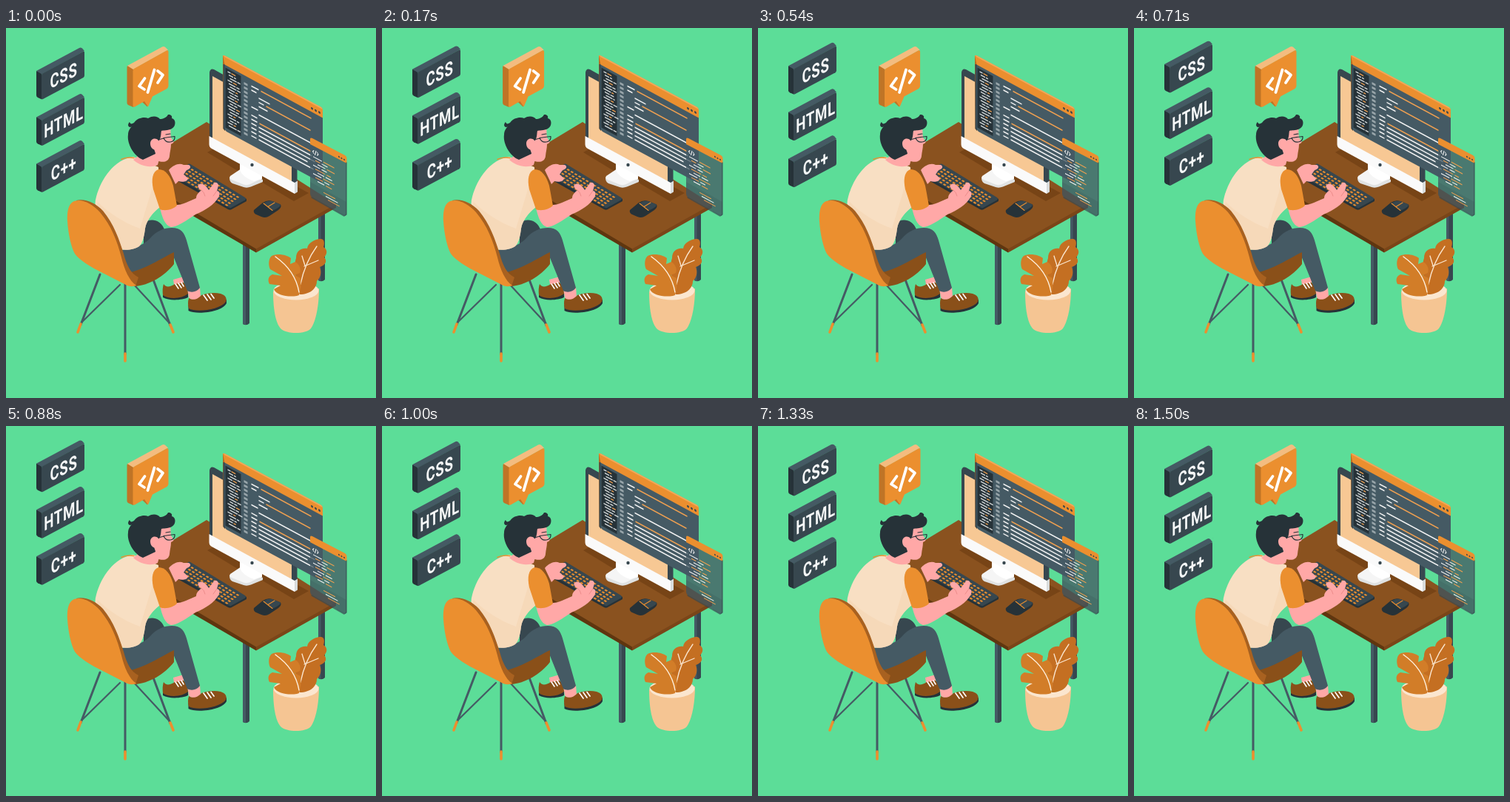
Recreate the animation shown at these times as an HTML page. Size 500 px wide and 500 px high, loop 1540 ms.

```html
<!DOCTYPE html>
<html lang="en">
<head>
<meta charset="utf-8">
<title>Programmer at a desk</title>
<style>
html, body { margin: 0; width: 100%; height: 100%; overflow: hidden; background: #5cdd98; }
svg { display: block; width: 100vw; height: 100vh; }
text { font-family: Roboto, "Liberation Sans", sans-serif; font-weight: 700; font-size: 26px; letter-spacing: .8px; fill: #f5f7f7; text-anchor: middle; }
.ln { fill: none; stroke-linecap: round; stroke-linejoin: round; }
.o { fill: #eb8f2f; }
.pink { fill: #ffa8a7; }
.slate { fill: #455a64; }
.mid { fill: #37474f; }
.ink { fill: #263238; }
.brown { fill: #8a5019; }
.tan { fill: #f5c593; }
</style>
</head>
<body>
<svg viewBox="0 0 500 500">
  <g id="signs"></g>

  <g id="bubble">
    <path fill="#bf7426" d="M164 51L172 55V107L165 104Q163.5 103 163.5 101V53Z"/>
    <path fill="#f3bc80" d="M164 51L211 25.5Q213 24.5 215 25.8L219 29.5L172 56Z"/>
    <path fill="#bf7426" d="M183 99L191 106.500L194 96Z"/>
    <path class="o" d="M173 55L217 30.500Q219.500 29.500 219.500 32V78Q219.500 80.500 217.500 82L198 92.500L192 106.500L187 99L174 106.500Q171.500 107.500 171.500 105V58Q171.500 56 173 55Z"/>
    <path class="ln" stroke="#fff" stroke-width="3.800" d="M187.500 68L180 78.500L187 83M200.500 56.500L191.500 87M205 58L212 63.500L205 74"/>
  </g>

  <!-- desk -->
  <path class="mid" d="M422 245H431V340Q427 344 422 341Z"/>
  <path class="slate" d="M422 245H425.500V342L422 341Z"/>
  <path class="mid" d="M320 288H329V399Q325 403 320 400Z"/>
  <path class="slate" d="M320 288H324V401L320 400Z"/>
  <path fill="#5f360f" d="M165 194L338 296V303.500L165 203Z"/>
  <path fill="#7a4518" d="M338 296L446 236V243L338 303.500Z"/>
  <path fill="#8a521f" d="M271 127L446 238L338 298.500L165 195V191Z"/>
  <path fill="#774416" d="M272 168L290 158L409 223L389 234L345 208L318 196Z"/>

  <!-- monitor -->
  <path fill="#e0e2e2" d="M302 202L318 191L347 205V208L331 214.500Q326 216.500 321 215L306 210Q302 208 302 202Z"/>
  <path fill="#f5f5f5" d="M303 200L318 190L346 203L330 211Q326 213 321 211.500L305 205Q301 203 303 200Z"/>
  <path fill="#fff" d="M316 181L346 197V204L335 207Q320 202 316 192Z"/>
  <path class="mid" d="M275 60Q276 54 281 56L390 117Q393 119 393.500 123V212L275 148Z"/>
  <path fill="#f7c894" d="M279 65L386 124V209L279 150Z"/>
  <path fill="#fafafa" d="M274.500 146L390 209V224L278 163Q274.500 161 274.500 157Z"/>
  <path fill="#d9dcdc" d="M390 209L394 206.500V221.500L390 224Z"/>
  <circle class="mid" cx="332.500" cy="185" r="2.200"/>

  <!-- code windows -->
  <path fill="#b86b20" d="M293 37L296 38V139L293.500 136Z"/>
  <path class="mid" d="M293.500 49H296V139L293.500 136Z"/>
  <path class="slate" d="M295.500 48L428 120V206Q427 210 424 208L298 140Q295.500 138 295.500 135Z"/>
  <path class="o" d="M293 37Q295 36.500 297 38L426 107Q428 108.500 428 111V121.500L295.500 49.500Z"/>
  <path fill="#f1a85c" d="M293 37L296 37.500L426 107L428 110L296 39.500Z"/>
  <g id="code" transform="matrix(1 .54 0 1 295.500 50)"></g>

  <path fill="#455a64" fill-opacity=".76" d="M411 155L460 181V252Q459 255 456 253L414 229Q411 227 411 224Z"/>
  <path fill="#263238" fill-opacity=".12" d="M411 208L460 235V252Q459 255 456 253L414 229Q411 227 411 224Z"/>
  <path class="o" d="M411 150Q411 147.500 414 149L458 172Q460.500 173.500 460.500 176V183L411 157Z"/>
  <path class="ln" stroke="#37474f" stroke-opacity=".65" stroke-width="1.500" d="M460 182V252L457 254L413 229"/>
  <g id="mini" transform="matrix(1 .54 0 1 411 157)"></g>

  <!-- keyboard and mouse -->
  <path class="ink" d="M228 202L247 184L325 231V234L304 245.500Q302 246 300 245L229 205Z"/>
  <path class="mid" d="M229 201L246 184Q248 183 250 184.500L323 229Q325 231 323 232.500L304 243Q302 243.500 300 242Z"/>
  <g id="keys"></g>
  <path class="ink" d="M335 246L347 236Q353 232 360 234L371 238.500Q373 242 368 246L356 254Q351 257.500 345 255L337 251.500Q334 249 335 246Z"/>
  <path class="mid" d="M348 237Q353 232.500 360 234L371 238.500Q371 241 366 244L360 247Z"/>
  <path class="ln" stroke="#eb8f2f" stroke-width="1.100" d="M348 237L360 246.500M354 241.500L363 236"/>

  <!-- plant -->
  <path class="tan" d="M361 356C361 379 364 398 371 406C379 414 405 414 412 406C419 396 423 374 423 352Z"/>
  <ellipse cx="392" cy="355" rx="30.500" ry="12.500" fill="#fbe6cf"/>
  <path fill="#c46f22" d="M397 360C392 345 388 322 392 311C392 302 398 297 407 298C408 290 417 286 424 285C430 284 431 290 429 296C434 299 435 304 430 310C434 314 433 320 424 323C427 330 425 338 420 342C420 352 411 360 397 360Z"/>
  <path class="ln" stroke="#fbe6cf" stroke-width="1.300" d="M398 346Q404 317 420 295M404 321L400 308M403 322L422 314"/>
  <path fill="#d27d28" d="M393 362C381 364 365 361 362 353L371 348L356 346C353 340 355 335 360 333L373 335L357 326C354 320 355 311 359 308C368 304 380 307 385 311L384 319L391 316C397 320 399 326 397 331L390 334L398 338C399 347 398 355 396 361Z"/>
  <path class="ln" stroke="#fff1df" stroke-width="1.400" d="M364 309Q391 328 396 357"/>

  <!-- chair legs -->
  <path class="ln" stroke="#455a64" stroke-width="3" d="M127 333L101 401M199 340L222 402M161 345V441"/>
  <path class="ln" stroke="#455a64" stroke-width="2.200" d="M102 398L154 347M174 348L222 400"/>
  <path class="ln" stroke="#eb8f2f" stroke-width="3.600" stroke-linecap="butt" d="M101 400L97 411M222 401L226 411M161 440V450"/>

  <!-- far leg -->
  <path class="pink" d="M226 340L240 336V350L228 353Z"/>
  <path class="ink" d="M212 357V364C220 369 238 368 246 364V358Z"/>
  <path class="brown" d="M213 346C216 351 222 350 228 346L240 344Q246 348 246 359C238 366 220 367 212 361Q211 352 213 346Z"/>
  <path class="ln" stroke="#fff" stroke-width="1.600" d="M229 346L233 352M233 345L237 351M237 344L240 349"/>
  <path fill="#37474f" d="M186 264C195 256 208 259 213 270L224 290L206 300L186 300Z"/>

  <!-- near leg -->
  <path class="pink" d="M245 351L262 350L263 363C259 368 250 369 247 364Z"/>
  <path class="ink" d="M246.500 374V382C257 388 292 384 298 372V367Z"/>
  <path class="brown" d="M247 365C253 369 260 366 264 361C272 358 282 357 290 359C297 361 299 366 297 370C289 381 257 385 247 379Q245 372 247 365Z"/>
  <path class="ln" stroke="#fff" stroke-width="1.700" d="M267 361L272 368M272 360L277 367M277 359.500L281 365"/>
  <path class="slate" d="M154 300C170 299 185 294 194 285C203 274 214 270 224 270C237 270 241 277 244 287L262 351C258 357 250 358 245 355L226 308L176 336L160 333Z"/>

  <!-- torso -->
  <path fill="#f8dfc3" d="M172 174C146 178 129 203 122 228C118 241 122 251 134 267L154 299C164 301 174 299 180 295C185 290 187 280 188 271C190 259 199 249 208 242L206 188Z"/>
  <path fill="#f6d6b4" d="M124 235C139 250 157 262 181 271L198 215L208 242C199 249 190 259 188 271C187 280 185 290 180 295C174 299 164 301 154 299L134 267C124 253 120 246 124 235Z" opacity=".65"/>
  <path class="ln" stroke="#eb8f2f" stroke-width="1.400" d="M156 177.500Q163 174 173 175.500"/>
  <path class="pink" d="M182 170L208 174L205 185C195 190 180 186 172 178Z"/>

  <!-- head -->
  <path class="pink" d="M204 136L222 135C223 141 222 145 223.500 149L226.500 153C227 156 224 156 223 157C223 163 221.500 167 221 173C220 182 211 182 203 179L183 176L190 150Z"/>
  <path class="ink" d="M185 178C174 174 163 157 165 144C165 139 168 135 170 133C166 136 163 131 167 127C168 130 170 130 173 128C178 121 187 120 192 122C198 118 205 119 208 123C212 123 217 121 219 117C223 117 225 119 224 122C230 123 230 133 224 136C219 139 212 138 210 139C209 143 210 149 206 153L198 153C199 164 202 167 202 170Z"/>
  <path class="pink" d="M207 153C203 147 195 149 195 156C195 163 201 167 207 163Z"/>
  <path class="ln" stroke="#263238" stroke-width="1.200" d="M206 151L213 149M213 148.500L228 146.500Q228.500 152 224 153.500Q216 156 213 148.500M216 144L222 143"/>

  <!-- arms -->
  <path class="pink" d="M220 192C226 185 234 182 240 185L247 185C251 187 249 191 244 192L240 198L246 203C246 207 239 209 233 207L229 211Z"/>
  <path class="pink" d="M208 243L231 239C238 239 248 234 257 230C257 225 261 222 264 219C260 217 257 213 262 211C266 209 271 214 274 219L280 211C282 207 287 209 287 213L285 220C290 221 289 225 287 229C282 238 270 246 256 252C244 260 231 269 223 269C215 267 211 256 208 243Z"/>
  <path class="ln" stroke="#e88483" stroke-width=".8" d="M264 219Q268 222 269 227M285 220L280 227"/>
  <path class="o" d="M206 191C216 191 222 200 226 213L231 240C226 245 215 248 208 245L199 218C196 204 198 194 206 191Z"/>

  <!-- chair shell -->
  <path class="brown" d="M164 331C187 327 210 311 227 303V319C215 335 193 348 174 349L159 342Z"/>
  <path fill="#a86120" d="M95 233C106 230 121 236 131 247C146 265 153 286 159 305C163 321 169 332 179 337L175 349L150 339Z"/>
  <path class="o" d="M94 233.500C84 236 82.500 248 83 261C84 278 88 296 93 305C99 313 109 319 119 325L160 346C166 349.500 171 350 176 348C167 342 160 327 156 310C150 288 143 268 127 249C117 238 104 231 94 233.500Z"/>
</svg>
<script>
const LOOP = 1540, PEAK = 720, REST = 1500, RISE = 9;
const get = id => document.getElementById(id);

let seed = 7;
function rnd() {
  seed = (seed * 16807) % 2147483647;
  return seed / 2147483647;
}
const bar = (x, y, w, h, fill) =>
  `<rect x="${x.toFixed(1)}" y="${y.toFixed(1)}" width="${w.toFixed(1)}" height="${h}" fill="${fill}"/>`;
const WHITE = '#f4f4f4', ORANGE = '#f0a050';

function sign(label, y) {
  return `<g transform="translate(0 ${y})">
    <path class="ink" d="M41 58L48.500 61V96.500L43 94Q41 93 41 91Z"/>
    <path class="slate" d="M41 58L99 27Q101 26 103 27.500L106 31L48.500 62.500Z"/>
    <path class="mid" d="M49.500 61.500L104 32Q106 31 106 33V64Q106 66 104.500 67L50 96Q48 97 48 95V64Q48 62.500 49.500 61.500Z"/>
    <text transform="matrix(.72 -.37 0 1 78 73)">${label}</text></g>`;
}
get('signs').innerHTML = sign('CSS', 0) + sign('HTML', 62.500) + sign('C++', 125.500);

function codeLines() {
  let s = bar(1, 3, 21, 81, '#263238');
  for (let i = 0; i < 20; i++) {
    const y = 6 + i * 3.8, x = 4 + (i % 3) * 1.5, w = 4 + rnd() * 7;
    s += bar(x, y, w, 1.5, '#d9dddd');
    s += bar(x + w + 1, y, 2 + rnd() * 4, 1.5, i % 3 ? '#d9dddd' : ORANGE);
  }
  for (let i = 0; i < 13; i++) s += bar(26, 9 + i * 5.6, 5, 3, '#98a5aa');
  // indent, white width, orange width
  const rows = [[36, 10, 68], [36, 7, 0], [46, 15, 0], [46, 7, 60], [46, 12, 0], [36, 9, 0], [46, 76, 0],
    [36, 8, 0], [36, 8, 70], [46, 72, 0], [46, 76, 0], [46, 66, 0], [46, 74, 0]];
  rows.forEach(([x, w, o], i) => {
    const y = 8 + i * 5.6;
    s += bar(x, y, w, 1.7, WHITE);
    if (o) s += bar(x + w + 3, y, o, 1.7, ORANGE);
    if (i > 7 && x > 40) s += bar(36, y, 7, 1.7, WHITE);
  });
  for (let i = 0; i < 3; i++) s += `<circle cx="${118 + i * 5}" cy="-5" r="1.500" fill="#37474f"/>`;
  return s;
}
get('code').innerHTML = codeLines();

function miniLines() {
  let s = '<path class="ln" stroke="#f4f4f4" stroke-width="1" d="M5 6L3.500 8L5 10M8 5L6.500 11M9.500 6L11 8L9.500 10"/>';
  for (let i = 0; i < 9; i++) {
    const y = 14 + i * 3.8, x = 4 + (i % 3) * 3, w = 6 + rnd() * 8;
    s += bar(x, y, w, 1.2, i % 3 === 1 ? ORANGE : WHITE);
    s += bar(x + w + 2, y, 5 + rnd() * 11, 1.2, i % 2 ? WHITE : ORANGE);
  }
  for (let i = 0; i < 3; i++) s += bar(18 + i * 3, 55 + i * 3.5, 13 + rnd() * 8, 1.1, i % 2 ? WHITE : ORANGE);
  for (let i = 0; i < 3; i++) s += `<circle cx="${39 + i * 3.5}" cy="-4" r="1" fill="#37474f"/>`;
  return s;
}
get('mini').innerHTML = miniLines();

let keys = '';
for (let r = 0; r < 5; r++) {
  for (let c = 0; c < 14; c++) {
    const x = 246 + c * 5.1 - r * 3.7, y = 187 + c * 3.05 + r * 2.75;
    keys += `<path class="o" d="M${x.toFixed(1)} ${y.toFixed(1)}l3 1.800l-1.800 1.300l-3 -1.800z"/>`;
  }
}
get('keys').innerHTML = keys;

function draw(t) {
  const lift = t < PEAK ? t / PEAK : Math.max(0, (REST - t) / (REST - PEAK));
  const sway = t < PEAK ? -0.6 * Math.sin(Math.PI * t / PEAK) : 0;
  get('signs').setAttribute('transform', `translate(0 ${-RISE * lift})`);
  get('bubble').setAttribute('transform', `translate(${sway} 0)`);
}

const start = performance.now();
function tick() {
  draw((performance.now() - start) % LOOP);
  requestAnimationFrame(tick);
}
draw(0);
requestAnimationFrame(tick);
</script>
</body>
</html>
```
